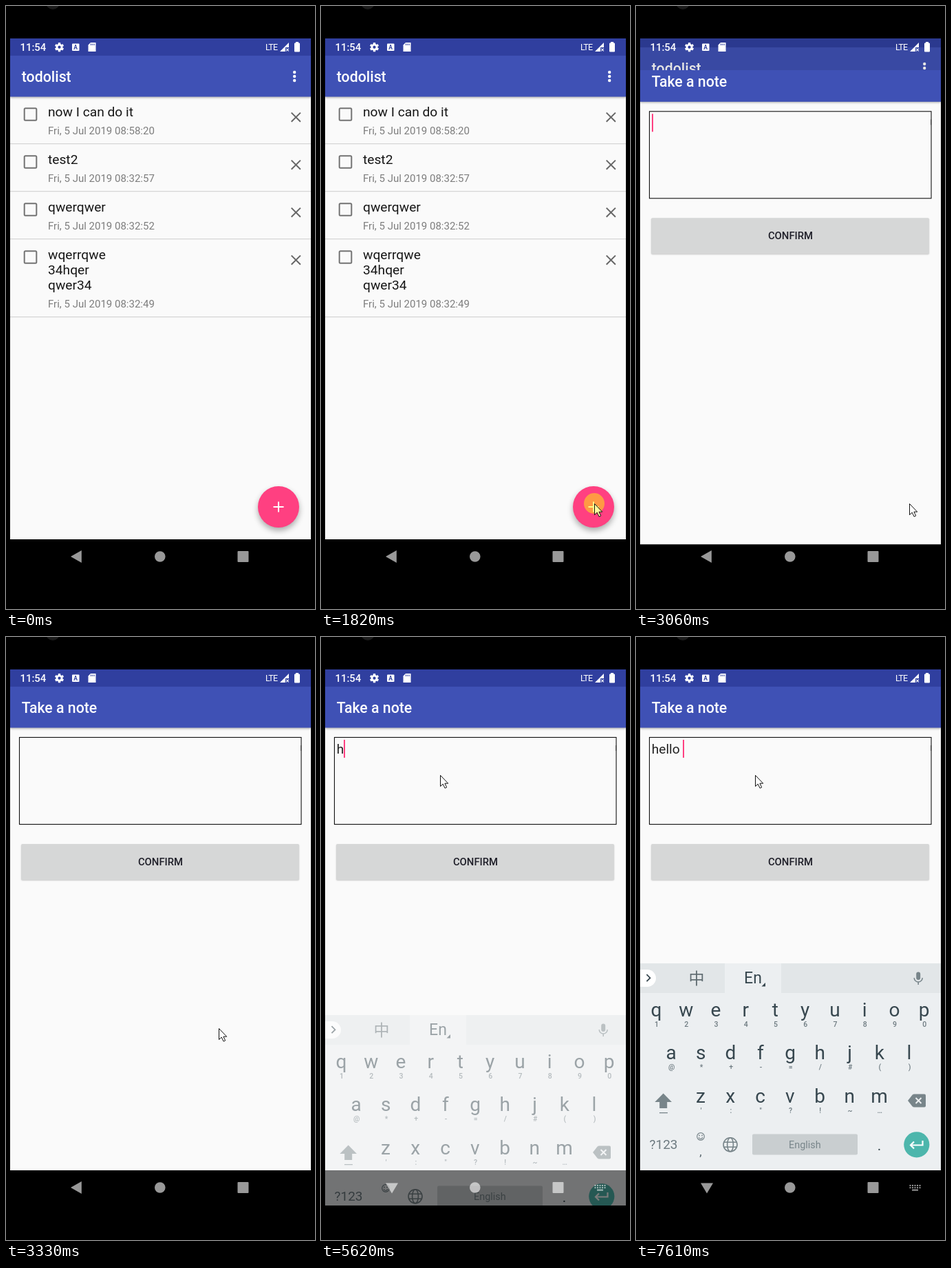
These frames come from a looping animation (449x874 px, 8 s). An HTML page with a canvas:

```html
<!DOCTYPE html>
<html lang="en">
<head>
<meta charset="utf-8">
<title>Note app</title>
<style>
html, body { margin: 0; width: 100%; height: 100%; overflow: hidden; background: #000; }
canvas { display: block; }
</style>
</head>
<body>
<canvas id="stage" width="449" height="874"></canvas>
<script>
const stage = document.getElementById('stage');
const layer = document.createElement('canvas');
layer.width = stage.width;
layer.height = stage.height;
let g = layer.getContext('2d');

const LOOP = 8000, L = 6, W = 437, TOP = 47, BOTTOM = 773, SCREEN = 777;
const BLUE = '#303f9f', WHITE = '#fff', PINK = '#ff4081', GRAY = '#78858a', SLATE = '#37474f';
const NOTES = [
  ['now I can do it', '08:58:20'],
  ['test2', '08:32:57'],
  ['qwerqwer', '08:32:52'],
  ['wqerrqwe\n34hqer\nqwer34', '08:32:49']
];
const WORD = 'hello ';
const KEY_TIMES = [5440, 6330, 6990, 7120, 7330, 7610];
// Pointer moves: from, to, x, y, bend
const MOVES = [
  [270, 1090, 405, 729, 1],
  [1095, 1300, 397, 721, 1],
  [3180, 3850, 210, 278, 1.4],
  [4155, 4630, 173, 200, 1]
];

const span = (t, from, ms) => Math.max(0, Math.min(1, (t - from) / ms));
const easeOut = (p, n) => 1 - (1 - p) ** n;
const slideEase = p => p * p / (p * p + 0.29 * (1 - p) ** 2);
const revealEase = p => 1.0077 * p ** 3 / (p ** 3 + 0.0077);

function rect(x, y, w, h, color) {
  g.fillStyle = color;
  g.fillRect(x, y, w, h);
}
function round(x, y, w, h, r, color) {
  g.fillStyle = color;
  g.beginPath();
  g.roundRect(x, y, w, h, r);
  g.fill();
}
function disc(x, y, r, color) {
  g.fillStyle = color;
  g.beginPath();
  g.arc(x, y, r, 0, 7);
  g.fill();
}
function arc(x, y, rx, ry, color, width, from = 0, to = 2 * Math.PI) {
  g.strokeStyle = color;
  g.lineWidth = width;
  g.beginPath();
  g.ellipse(x, y, rx, ry, 0, from, to);
  g.stroke();
}
function trace(pts) {
  g.beginPath();
  for (let i = 0; i < pts.length; i += 2) g.lineTo(pts[i], pts[i + 1]);
}
function poly(color, ...pts) {
  trace(pts);
  g.fillStyle = color;
  g.fill();
}
function line(color, width, ...pts) {
  trace(pts);
  g.strokeStyle = color;
  g.lineWidth = width;
  g.stroke();
}
function cross(x, y, r, color, width) {
  line(color, width, x - r, y - r, x + r, y + r);
  line(color, width, x + r, y - r, x - r, y + r);
}
// Opens right for d > 0, left for d < 0
function chevron(x, y, d, color, width) {
  const r = Math.abs(d);
  line(color, width, x - d / 2, y - r, x + d / 2, y, x - d / 2, y + r);
}
function text(str, x, y, size, color, weight = 400, align = 'left') {
  g.font = `${weight} ${size}px Roboto, "Noto Sans CJK SC", sans-serif`;
  g.textAlign = align;
  g.fillStyle = color;
  g.fillText(str, x, y);
}
const label = (str, x, y, size, color, weight) => text(str, x, y, size, color, weight, 'center');

function shadow(alpha, blur, dy, draw) {
  g.save();
  g.shadowColor = `rgba(0,0,0,${alpha})`;
  g.shadowBlur = blur;
  g.shadowOffsetY = dy;
  draw();
  g.restore();
}
function clipped(y, h, draw) {
  g.save();
  g.beginPath();
  g.rect(L, y, W, Math.max(0, h));
  g.clip();
  draw();
  g.restore();
}

function windowBase(title) {
  rect(L, TOP, W, BOTTOM - TOP, '#fafafa');
  clipped(TOP, 100, () => shadow(0.3, 3, 1, () => rect(L, 72, W, 59.5, '#3f51b5')));
  rect(L, TOP, W, 25, BLUE);
  text(title, 22.8, 110, 21.26, WHITE, 500);
}

function listWindow(t) {
  windowBase('todolist');
  for (let i = 0; i < 3; i++) disc(419.2, 96 + i * 6, 2.2, WHITE);

  let y = 131;
  for (const [note, time] of NOTES) {
    const lines = note.split('\n');
    g.strokeStyle = '#737373';
    g.lineWidth = 2;
    g.beginPath();
    g.roundRect(26.7, y + 17.2, 17.6, 17.6, 1.5);
    g.stroke();
    cross(421.3, y + 30.2, 6.6, '#666', 2);
    lines.forEach((s, i) => text(s, 61, y + 29 + i * 22, 19.2, '#161616'));
    y += 22 * (lines.length - 1) + 69;
    text('Fri, 5 Jul 2019 ' + time, 61, y - 14, 15, '#7d7d7d');
    rect(L, y - 1, W, 1.3, '#d6d6d6');
  }

  const p = span(t, 2405, 220), press = Math.sin(Math.PI * p);
  shadow(0.32, 8 + press * 6, 4.5 + press * 3, () => disc(396, 726, 30, PINK));
  disc(396, 726, 30 * Math.min(1, 0.3 + p * 1.5), `rgba(255,255,255,${press * 0.22})`);
  rect(388.5, 725, 15, 2, WHITE);
  rect(395, 718.5, 2, 15, WHITE);
}

function noteWindow(t) {
  windowBase('Take a note');
  g.strokeStyle = '#111';
  g.lineWidth = 1.1;
  g.strokeRect(19.5, 145.5, 409.5, 126);
  rect(428, 157, 1, 8, '#444');
  shadow(0.2, 2, 1, () => round(22, 300, 404, 52, 2, '#d6d7d7'));
  label('CONFIRM', 224.5, 331, 14.88, '#20202a', 500);

  const count = KEY_TIMES.filter(k => k <= t).length;
  const typed = WORD.slice(0, count);
  text(typed, 22.8, 169, 19.13, '#222');
  const since = t - (count ? KEY_TIMES[count - 1] : 2770);
  if (since % 1000 < (count ? 482 : 498)) {
    rect(Math.floor(23 + g.measureText(typed).width), 149, 2, 26, PINK);
  }
}

function keyRow(keys, hints, x, y) {
  [...keys].forEach((k, i) => {
    const cx = x + i * 43.25;
    label(k, cx, y, 28, SLATE);
    label(hints[i], cx + 0.7, y + 15, 10.5, '#6d7a80', 500);
  });
}

function keyboard() {
  rect(L, 473, W, 300, '#e2e6e8');
  rect(129, 473, 82, 43, '#eceff1');
  rect(L, 516, W, 257, '#eceff1');

  round(L, 482, 23, 25, [0, 12.5, 12.5, 0], WHITE);
  chevron(18, 494.2, 5, SLATE, 1.8);
  label('中', 88, 503, 23, '#5f6b70');
  label('En', 170, 502, 23, SLATE);
  poly(SLATE, 188, 501, 188, 506.5, 182.5, 506.5);
  round(407.2, 485.5, 6, 11.5, 3, GRAY);
  arc(410.2, 494, 6, 6, GRAY, 1.5, 0, Math.PI);
  rect(409.4, 500, 1.6, 4, GRAY);

  keyRow('qwertyuiop', '1234567890', 29.4, 550);
  keyRow('asdfghjkl', '@*+-=/#()', 51, 612);
  keyRow('zxcvbnm', '\':"?!~…', 94, 675);

  poly(GRAY, 39.7, 661.5, 52, 674, 27.4, 674);
  rect(34.2, 673, 11, 10, GRAY);
  rect(34, 689, 12, 1.3, GRAY);
  poly(GRAY, 395, 672, 402.5, 662.5, 402.5, 681.5);
  round(402, 662.5, 19, 19, 2, GRAY);
  cross(410.5, 672, 4, '#eceff1', 2);

  label('?123', 40, 742, 19, '#6d7a80');
  arc(94, 724, 5.3, 5.3, GRAY, 1.2);
  arc(94, 724.5, 2.8, 2.8, GRAY, 1.2, 0.2, 2.94);
  for (const side of [-1, 1]) {
    disc(94 + side * 2, 722.5, 0.9, GRAY);
    rect(128, 735 + side * 3.5, 18, 1.5, GRAY);
  }
  for (const rx of [10, 4.4]) arc(137, 735.8, rx, 10, GRAY, 1.6);
  label(',', 94, 752, 17, '#55636a');
  round(169, 720.5, 153, 30, 2, '#c9ced0');
  label('English', 245.3, 741, 14.4, GRAY);
  label('.', 353.5, 744, 21, SLATE);
  disc(407.8, 735.8, 18.6, '#4db6ac');
  line(WHITE, 2.2, 416.5, 730, 416.5, 736.5, 400, 736.5);
  chevron(401.5, 736.5, -5, WHITE, 2.2);
}

function navBar(typing) {
  const c = 'rgba(255,255,255,.6)';
  if (typing) {
    poly(c, 94, 791.5, 112, 791.5, 103, 806.5);
    for (let i = 0; i < 10; i++) rect(397.5 + (i % 5) * 3.5, 794 + (i > 4) * 3.2, 2, 2, c);
    rect(401, 800.6, 9, 2, c);
  } else {
    poly(c, 94, 798, 109.8, 789, 109.8, 807);
  }
  disc(223.8, 798, 7.8, c);
  round(336.5, 790, 16, 16, 1, c);
}

function statusIcons() {
  text('11:54', 20.5, 65, 14.88, WHITE, 500);
  g.save();
  g.translate(77.5, 59.7);
  for (let i = 0; i < 3; i++) {
    rect(-1.7, -6.6, 3.4, 13.2, WHITE);
    g.rotate(Math.PI / 3);
  }
  g.restore();
  disc(77.5, 59.7, 4.9, WHITE);
  disc(77.5, 59.7, 2.1, BLUE);
  round(96, 54.5, 10.5, 10.5, 1, WHITE);
  label('A', 101.2, 63, 8.5, BLUE, 700);
  poly(WHITE, 123, 53, 130.5, 53, 130.5, 66, 119.5, 66, 119.5, 56.5);
  for (let i = 0; i < 3; i++) rect(123 + i * 2.3, 54.5, 1, 2.5, BLUE);
  g.letterSpacing = '-0.8px';
  text('LTE', 377, 64, 12.5, WHITE);
  g.letterSpacing = '0px';
  poly(WHITE, 398, 66, 411, 53, 411, 60, 406, 60, 406, 66);
  cross(409, 63.5, 1.9, WHITE, 1.1);
  round(419, 53.5, 8, 13, 1, WHITE);
  rect(421, 52, 4, 2, WHITE);
}

function pointer(t) {
  let x = 372, y = 876;
  for (const [from, to, tx, ty, bend] of MOVES) {
    const p = easeOut(span(t, from, to - from), 2.5);
    x += (tx - x) * p;
    y += (ty - y) * p ** bend;
  }
  const down = t >= 1820 && t < 2000;
  if (down) disc(397, 721, 15, 'rgba(255,255,0,.47)');
  g.save();
  g.translate(Math.round(x) + 0.5, Math.round(y) + 0.5);
  poly(down ? '#ffffa0' : WHITE, 0, 0, 0, 16, 3.7, 12.6, 6.6, 18.6, 9.2, 17.4, 6.4, 11.7, 11.2, 11.7);
  g.closePath();
  g.strokeStyle = '#111';
  g.lineWidth = 1;
  g.stroke();
  g.restore();
}

function draw(t) {
  rect(0, 0, 449, 874, '#000');
  disc(68, -5, 10, '#1c1c1c');

  const open = span(t, 2812, 499), slide = slideEase(open);
  if (open < 1) {
    clipped(TOP, SCREEN, () => {
      g.translate(0, -0.02 * SCREEN * slide);
      listWindow(t);
      rect(L, TOP, W, SCREEN, `rgba(0,0,0,${0.1 * span(open, 0, 0.275)})`);
    });
  }
  if (open > 0) {
    const dy = 0.041 * SCREEN * (1 - slide);
    const top = TOP + dy + 0.959 * SCREEN * (1 - revealEase(open));
    clipped(top, TOP + SCREEN - top, () => {
      g.translate(0, dy);
      noteWindow(t);
    });
  }

  const rise = easeOut(span(t, 5558, 220), 2);
  if (rise > 0) {
    clipped(TOP, SCREEN, () => {
      g.globalAlpha = rise;
      g.drawImage(layer, 0, Math.round(146 * (1 - rise)));
    });
  }
  navBar(rise > 0);
  statusIcons();
  pointer(t);
}

keyboard();
g = stage.getContext('2d');

let start;
function frame(now) {
  start ??= now;
  draw((now - start) % LOOP);
  requestAnimationFrame(frame);
}
requestAnimationFrame(frame);
</script>
</body>
</html>
```
